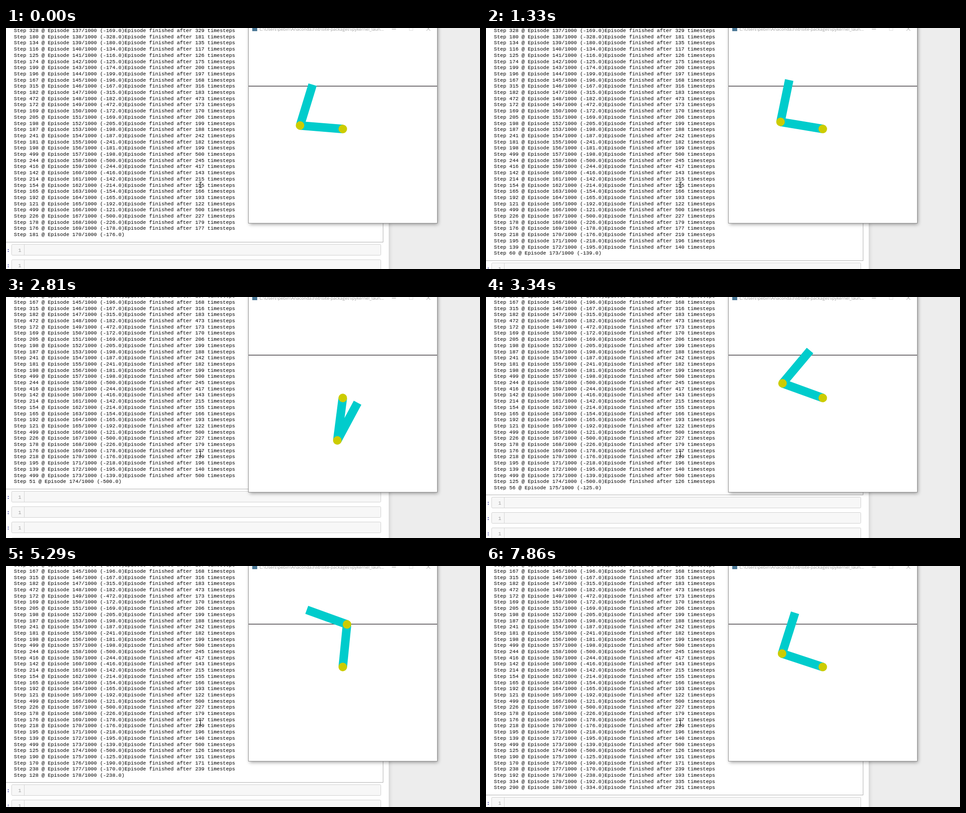
Write an HTML page with a canvas that moves like this. It is 1049 px wide and 534 px high and loops after 7990 ms.

```html
<!DOCTYPE html>
<html lang="en">
<head>
<meta charset="utf-8">
<title>Acrobot training</title>
<style>
  html, body { margin: 0; width: 100%; height: 100%; overflow: hidden; background: #fff; }
  canvas { display: block; }
</style>
</head>
<body>
<canvas id="stage" width="1049" height="534"></canvas>
<script>
const ctx = document.getElementById('stage').getContext('2d');
const MONO = '11.33px "Liberation Mono", "Courier New", monospace';
const LOOP = 7990;
const REFRESH = 133;    // typical ms between screen updates
const LINE = 13.7;
const FIRST = 136;      // episode of the first log entry
const OPENING = 170;    // episode running when the loop starts
const OPENING_STEP = 181;
const PRINT_LAG = 50;   // steps before a new episode gets its line
const SCROLL_AFTER = 173;

// Log contents: final step counter of each episode; rewards follow from it
const log = [
  169, 328, 180, 134, 116, 125, 174, 199, 196, 167, 315, 182, 472, 172, 169,
  205, 198, 187, 241, 181, 198, 499, 244, 416, 142, 214, 154, 165, 192, 121,
  499, 226, 178, 176, 218, 195, 139, 499, 125, 190, 170, 238, 192, 334, 290
];
const lastStep = episode => log[episode - FIRST];

// Key points of the simulation: [ms, steps taken since the loop began]
const pace = [
  [0, 0], [1330, 431], [2550, 870], [2810, 921], [4200, 1355],
  [5290, 1721], [6210, 1999], [7860, 2409], [LOOP, 2409]
];

// Link angles in degrees left on screen by each finished episode
const poses = [
  [184.6, -73], [-80.5, -13], [213, -68.5], [189.5, -78.3],
  [97.3, -61.8], [200, -50], [-75, 186], [221.6, -39.2],
  [-84.3, 199.9], [-68.4, 197.2], [-78.5, -12], [198.2, -72.4]
];

function stepsAt(time) {
  const i = pace.findLastIndex(key => key[0] <= time);
  const [t0, s0] = pace[i], [t1, s1] = pace[i + 1];
  const frames = Math.round((t1 - t0) / REFRESH);
  const part = Math.floor((time - t0) / (t1 - t0) * frames) / frames;
  return Math.round(s0 + (s1 - s0) * part);
}

function progressAt(time) {
  let episode = OPENING;
  let step = OPENING_STEP + stepsAt(time);
  while (step > lastStep(episode) + PRINT_LAG) step -= lastStep(episode++);
  const done = step >= lastStep(episode);
  return { episode, step, finished: done ? episode : episode - 1 };
}

function line(x1, y1, x2, y2, color, width = 1) {
  ctx.strokeStyle = color;
  ctx.lineWidth = width;
  ctx.beginPath();
  ctx.moveTo(x1, y1);
  ctx.lineTo(x2, y2);
  ctx.stroke();
}

function box(x, y, w, h, fill, stroke) {
  ctx.fillStyle = fill;
  ctx.fillRect(x, y, w, h);
  if (!stroke) return;
  ctx.strokeStyle = stroke;
  ctx.lineWidth = 1;
  ctx.strokeRect(x, y, w, h);
}

function text(str, x, y, color, font = MONO) {
  ctx.font = font;
  ctx.fillStyle = color;
  ctx.fillText(str, x, y);
}

function shadowBox(x, y, w, h, color, blur, offset) {
  ctx.save();
  ctx.shadowColor = color;
  ctx.shadowBlur = blur;
  ctx.shadowOffsetX = ctx.shadowOffsetY = offset;
  box(x, y, w, h, '#fff');
  ctx.restore();
}

function drawCell(y) {
  ctx.fillStyle = '#f7f7f7';
  ctx.strokeStyle = '#cfcfcf';
  ctx.lineWidth = 1;
  ctx.beginPath();
  ctx.roundRect(12.5, y, 817, 24, 2);
  ctx.fill();
  ctx.stroke();
  line(40.5, y, 40.5, y + 24, '#d4d4d4');
  text('1', 27, y + 16, '#999');
  text(':', 1.5, y + 16, '#000080', 'bold ' + MONO);
}

function drawNotebook({ episode, step, finished }) {
  const top = finished < SCROLL_AFTER ? 9 : -94.7;
  const baseline = n => top + LINE * (n - FIRST - 1);
  for (let n = FIRST + 1; n <= episode; n++) {
    const last = lastStep(n), prev = lastStep(n - 1);
    const reward = prev === 499 ? 500 : prev;
    let row = `Step ${n <= finished ? last : step} @ Episode ${n}/1000 (-${reward}.0)`;
    if (n <= finished) row += `Episode finished after ${last + 1} timesteps`;
    text(row, 17.6, baseline(n), '#000');
  }
  const bottom = Math.floor(baseline(episode) + 13) + 0.5;
  ctx.strokeStyle = '#ababab';
  ctx.lineWidth = 1;
  ctx.strokeRect(-5.5, -5.5, 840, bottom + 5.5);
  for (let y = bottom + 5; y < 540; y += 34.2) drawCell(Math.floor(y) + 0.5);
}

function drawCursor() {
  line(430.5, 341, 430.5, 354, '#111', 1.2);
  line(427, 341.5, 434, 341.5, '#111');
  line(427, 353.5, 434, 353.5, '#111');
}

function drawArm(angles) {
  const size = 94.8;
  ctx.save();
  ctx.translate(745.3, 223.7);
  let turned = 0;
  for (const deg of angles) {
    ctx.rotate((deg - turned) * Math.PI / 180);
    turned = deg;
    box(0, -size / 10, size, size / 5, '#00cccc');
    ctx.fillStyle = '#cccc00';
    ctx.beginPath();
    ctx.arc(0, 0, size / 10, 0, 2 * Math.PI);
    ctx.fill();
    ctx.translate(size, 0);
  }
  ctx.restore();
}

function drawWindow(angles) {
  shadowBox(537, -20, 417, 453, 'rgba(0,0,0,.4)', 8, 2);
  box(536.5, -20.5, 418, 453, '#fff', '#8c8c8c');
  box(545, -4, 11, 11, '#4b7896');
  text('C:\\Users\\pebin\\Anaconda3\\lib\\site-packages\\ipykernel_laun...',
    561, 6, '#999', '9.65px "Open Sans", "Noto Sans", sans-serif');
  line(854, 2.5, 863, 2.5, '#999');
  ctx.strokeStyle = '#e2e2e2';
  ctx.strokeRect(892.5, -2.5, 8, 8);
  line(930.5, -2.5, 939, 6, '#999');
  line(939, -2.5, 930.5, 6, '#999');
  line(537, 128.75, 954, 128.75, '#3c363c', 1.5);
  drawArm(angles);
}

function draw(time) {
  const progress = progressAt(time);
  box(0, 0, 1049, 534, '#ededed');
  shadowBox(-20, -20, 867, 580, 'rgba(87,87,87,.3)', 9, 0);
  drawNotebook(progress);
  drawCursor();
  drawWindow(poses[progress.finished - OPENING + 1]);
}

const begin = performance.now();
function loop() {
  draw((performance.now() - begin) % LOOP);
  requestAnimationFrame(loop);
}
loop();
</script>
</body>
</html>
```
